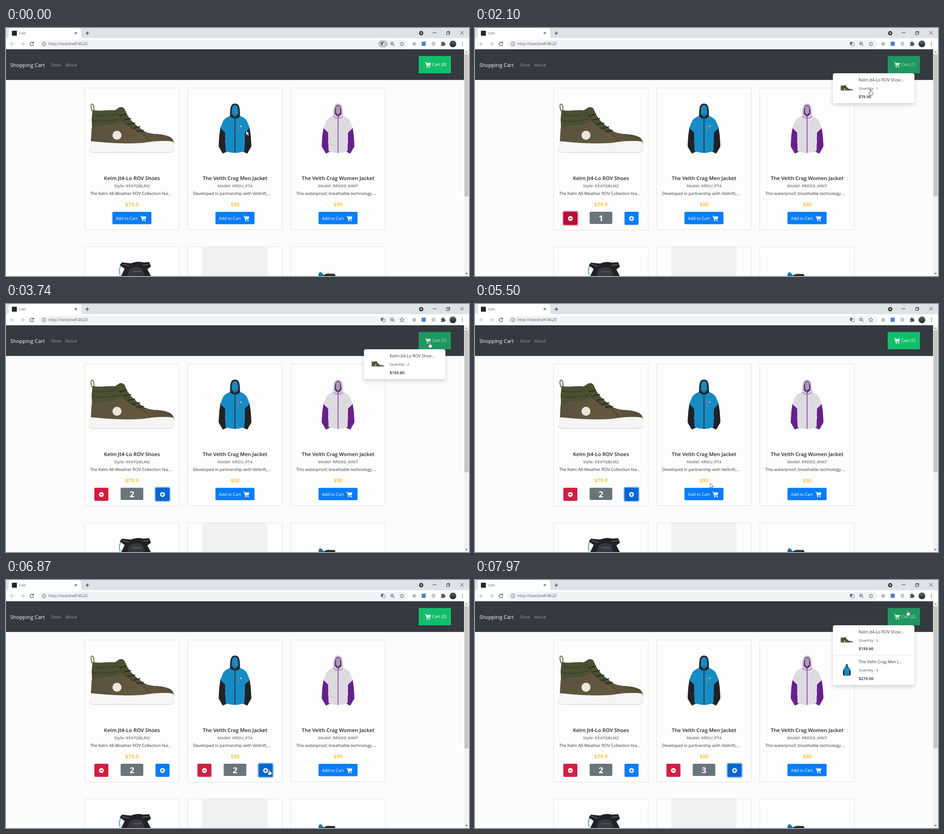
An HTML page for the animation above (8000 ms loop, 1022x548 px).

```html
<!DOCTYPE html>
<html lang="en">
<head>
<meta charset="utf-8">
<title>Cart</title>
<style>
  html, body { margin: 0; width: 100%; height: 100%; overflow: hidden; background: #fcfcfb; }
  svg { display: block; width: 100vw; height: 100vh; }
  text { font-family: "Open Sans", "Noto Sans", sans-serif; font-size: 9.15px; white-space: pre; }
  .mid { text-anchor: middle; }
  .semi { font-weight: 600; }
</style>
</head>
<body>
<svg id="stage" viewBox="0 0 1022 548">
  <defs>
    <g id="cart">
      <path d="M0 0H2.7L3.1 1.5H13L11.5 7.2H4.3L4.6 8.4H11.2V9.5H3.6L1.9 1.2H0Z"/>
      <circle cx="4.9" cy="10.9" r="1.2"/><circle cx="10.4" cy="10.9" r="1.2"/>
    </g>
    <linearGradient id="suede" x2="1" y2="0">
      <stop stop-color="#5a5240"/><stop offset=".6" stop-color="#64583f"/><stop offset="1" stop-color="#574b39"/>
    </linearGradient>
    <g id="shoe">
      <path d="M190 184Q185 170 190 168Q195 168 194 184" fill="none" stroke="#74745f" stroke-width="2.2"/>
      <path d="M191 181C204 185 224 180 240 182L250 175.5Q257 173 262 179L267 191L276 204L290 217L306 229Q316 233 326 234Q352 235 364 242Q371 248 371 257L187 256Q191 226 189 202Z" fill="#4a5034"/>
      <path d="M189 222Q210 213 236 214L258 205Q280 227 308 231Q316 233 326 234Q352 235 364 242Q371 248 371 257L187 256Z" fill="url(#suede)"/>
      <path d="M191 192Q216 197 243 190M190 204Q220 209 250 201" fill="none" stroke="#363b25" stroke-width="1.5"/>
      <path d="M244 183L258 205Q278 227 308 231M292 231Q314 238 318 253" fill="none" stroke="#3c3b29" stroke-width="1.3"/>
      <path d="M255 193L267 190M260 203L276 200M268 213L285 210M278 222L296 218M288 229L304 226" stroke="#2b2f1f" stroke-width="2.6"/>
      <circle cx="253" cy="194" r="1.8" fill="#25271b"/>
      <circle cx="245" cy="237" r="10" fill="#eae6da"/>
      <path d="M186 250Q250 257 300 254Q345 247 369 251Q374 261 371 271Q369 275 358 275H194Q184 275 183 269Z" fill="#f5f5f4"/>
      <path d="M183 270Q185 275 194 275H358Q369 275 371 270" fill="none" stroke="#c9c8c6" stroke-width="1"/>
    </g>
    <linearGradient id="face" x2="0" y2="1">
      <stop stop-color="#5e6a5c"/><stop offset="1" stop-color="#20241f"/>
    </linearGradient>
    <filter id="soft" x="-20%" y="-30%" width="140%" height="170%">
      <feDropShadow dx="0" dy="4" stdDeviation="5" flood-opacity=".17"/>
    </filter>
  </defs>
</svg>
<script>
const LOOP = 8000, STEP = 227.5;
const svg = document.getElementById('stage');

function el(tag, attrs, parent = svg, text) {
  const node = document.createElementNS('http://www.w3.org/2000/svg', tag);
  for (const key in attrs) node.setAttribute(key, attrs[key]);
  if (text !== undefined) node.textContent = text;
  return parent.appendChild(node);
}
const group = (parent, attrs = {}) => el('g', attrs, parent);
const box = (parent, x, y, width, height, fill, rx = 0, more = {}) =>
  el('rect', { x, y, width, height, fill, rx, ...more }, parent);
const dot = (parent, cx, cy, r, fill) => el('circle', { cx, cy, r, fill }, parent);
const shape = (parent, d, fill, more = {}) => el('path', { d, fill, ...more }, parent);
const line = (parent, d, stroke, width = 1) =>
  shape(parent, d, 'none', { stroke, 'stroke-width': width });
const label = (parent, x, y, text, fill, size = 9.15, cls = '') =>
  el('text', { x, y, fill, class: cls, style: `font-size:${size}px` }, parent, text);
const icon = (parent, x, y, fill = '#fff') =>
  el('use', { href: '#cart', x, y, fill }, parent);
const show = (node, on) => node.setAttribute('visibility', on ? 'inherit' : 'hidden');
const write = (node, text) => { if (node.textContent !== text) node.textContent = text; };

// Jacket around x = 0; each half is drawn once and mirrored.
function jacket(parent, c) {
  const g = group(parent);
  for (const side of [1, -1]) {
    const h = group(g, { transform: `scale(${side} 1)` });
    shape(h, 'M-32 219Q-36 240 -36 262L-27 277.5L-17 273L-22 252L-19 228Z', c.sleeve);
    shape(h, 'M.3 191L-10 194Q-23 198 -27 207L-32.5 221L-22 231L-21 272Q-10 276 .3 276Z', c.body);
    shape(h, 'M.3 167C-9 167 -11 174 -11 195L-5 199L.3 199Z', c.hood);
    shape(h, 'M.3 170C-6 170 -7.5 176 -7.5 190L.3 197Z', c.lining);
    line(h, 'M-11 195Q-7 199 -1 200', c.trim);
  }
  shape(g, 'M-4.5 174Q0 170 4.5 174L4.5 187Q0 194 -4.5 187Z', c.inside);
  line(g, 'M0 196V276', c.trim, 1.6);
  if (c.pocket) line(g, 'M7 211V228', c.pocket, 2);
  dot(g, 13, 217, 1.4, c.mark);
  return g;
}
const BLUE = { body: '#178bc4', sleeve: '#202226', hood: '#23262b', lining: '#147fb5',
  inside: '#1a8ac0', trim: '#1d2c3a', pocket: '#77858c', mark: '#e4edf1' };
const GREY = { body: '#dcdbdf', sleeve: '#67208c', hood: '#cfccd2', lining: '#6f2a92',
  inside: '#a5a0a8', trim: '#7d3b9c', mark: '#c6c4c9' };

// Browser frame
box(svg, 0, 0, 1022, 548, '#fcfcfb');
box(svg, 0, 0, 1022, 24, '#dee1e6');
shape(svg, 'M0 23Q6 23 6 17V6Q6 0 12 0H160Q166 0 166 6V17Q166 23 172 23Z', '#fff');
box(svg, 0, 22.5, 1022, 24.5, '#fff');
box(svg, 13, 6, 11, 11, '#20272d', 1);
label(svg, 29, 14, 'Cart', '#45494d', 7.6);
line(svg, 'M151.7 9L156.3 13.6M156.3 9L151.7 13.6', '#4a4d51', 1.1);
line(svg, 'M175.5 11.5H183.5M179.5 7.5V15.5', '#3c4043', 1.3);
dot(svg, 916.5, 11.5, 4.8, '#34373b');
shape(svg, 'M914 10.3H919L916.5 13.5Z', '#fff');
line(svg, 'M942 10.5H950M972.5 9H978V14.5H972.5ZM974 9V7.5H979.5V13H978M1003 7L1010 14M1010 7L1003 14', '#33363a');
line(svg, 'M18.5 35H10.5M14 31L10.2 35L14 39M32 35H40M36.5 31L40.3 35L36.5 39', '#b4b7ba', 1.2);
line(svg, 'M60.3 32.5A4 4 0 1 0 61 36M61 30.5V33.4H58', '#4d5155', 1.3);
box(svg, 72, 26, 817, 18, '#f1f3f4', 9);
el('circle', { cx: 84, cy: 35, r: 4.1, fill: 'none', stroke: '#5f6368' });
line(svg, 'M84 34.3V37.4M84 32.3V33.4', '#5f6368', 1.1);
label(svg, 94, 38, 'http://testshelf:4620', '#5b5f64', 9.1);
const glow = box(svg, 821, 27, 22, 16, '#c6c9cd', 8);
box(svg, 827.5, 30.5, 6, 7, '#6a6e73', 1);
box(svg, 831.5, 33, 5.5, 6.5, '#f1f3f4', 1, { stroke: '#6a6e73', 'stroke-width': .9 });
el('circle', { cx: 852, cy: 34, r: 3, fill: 'none', stroke: '#55595d', 'stroke-width': 1.1 });
line(svg, 'M854.3 36.3L857.3 39.3M850.5 34H853.5', '#55595d', 1.1);
line(svg, 'M874 30.2L875.4 33.4L878.7 33.7L876.2 36L877 39.4L874 37.5L871 39.4L871.8 36L869.3 33.7L872.6 33.4Z', '#55595d', .9);
dot(svg, 901, 35, 4, '#b5b8bb');
box(svg, 917.5, 30, 9, 9.5, '#4c80d8', 1);
box(svg, 939.5, 30.5, 8, 8.5, '#c5c9cc', 1);
shape(svg, 'M960 32H963Q962.5 29.5 964.5 29.5T966 32H968.5V34.5Q970.5 34 970.5 35.8T968.5 37V39.5H960V37Q962 37 962 35.7T960 34.5Z', '#515559');
dot(svg, 986.5, 35, 7.5, 'url(#face)');
for (const y of [31.5, 35, 38.5]) dot(svg, 1007.5, y, 1, '#515559');

// Second row
const lower = group(svg);
for (let i = 0; i < 3; i++)
  box(lower, 173.5 + i * STEP, 483, 209, 90, '#fdfdfd', 2.4, { stroke: '#e0e0df' });
line(lower, 'M252 546Q246 526 262 520', '#3c9cc4', 1.8);
shape(lower, 'M254 548L262 532L251 524L256 518L276 520Q290 514 303 518L316 517L320 527L312 533L320 548Z', '#1f2125');
shape(lower, 'M272 533Q286 524 301 531L306 548H268Z', '#35383d');
line(lower, 'M257 522L272 526M302 524L315 522M279 538H298', '#62666b', 1.6);
box(lower, 433, 483.5, 144, 70, '#f1f1f0');
shape(lower, 'M690 543Q695 537 699 543L703 548H690Z', '#1c6f88');
line(lower, 'M691 541Q695 537 698 543', '#35b5d3', 1.6);
shape(lower, 'M700 548Q706 541 716 543L725 543L728 548Z', '#2a2d31');

// First row
const ITEMS = [
  ['Kelm Jt4-Lo ROV Shoes', 'Style: KE47QBLM2', 'The Kelm All-Weather ROV Collection fea...', '$79.9'],
  ['The Velth Crag Men Jacket', 'Model: KRDU_PT4', 'Developed in partnership with Velitrift,...', '$90'],
  ['The Velth Crag Women Jacket', 'Model: RRDEG_MM7', 'This waterproof, breathable technology ...', '$90']
];
const RED = ['#cf2044', '#b90e35'], PLUS = ['#097df5', '#0866cf'];

function knob(parent, x, colors, ring, sign) {
  const halo = box(parent, x - 1, 405, 33, 31, 'none', 3, { stroke: ring, 'stroke-width': 2.4 });
  const face = box(parent, x, 406, 31, 29, colors[0], 2.4);
  dot(parent, x + 15.5, 421, 5.4, '#fff');
  const mark = line(parent, sign, colors[0], 1.8);
  return on => {
    show(halo, on);
    face.setAttribute('fill', colors[+on]);
    mark.setAttribute('stroke', colors[+on]);
  };
}

const cards = ITEMS.map(([name, code, about, price], i) => {
  const g = group(svg, { transform: `translate(${i * STEP} 0)` });
  const frame = box(g, 173.5, 132.5, 209, 313, '#fdfdfd', 2.4, { stroke: '#dededd' });
  if (i) jacket(g, i === 1 ? BLUE : GREY).setAttribute('transform', 'translate(278 0)');
  else el('use', { href: '#shoe' }, g);
  label(g, 278, 336, name, '#212529', 11.4, 'mid semi');
  label(g, 278, 351.5, code, '#6f777e', 9.1, 'mid semi');
  label(g, 185.7, 369, about, '#34383c');
  label(g, 278, 394, price, '#f6bb1c', 11.5, 'mid semi');
  const add = group(g);
  const face = box(add, 234.8, 406.2, 86.2, 27.4, PLUS[0], 2.4);
  label(add, 242.5, 423.6, 'Add to Cart', '#fff');
  icon(add, 296.5, 415);
  const count = group(g);
  const minus = knob(count, 195, RED, '#eca0b0', 'M207.5 421H213.5');
  box(count, 253, 406, 50, 27, '#6a747b', 2.4);
  const number = label(count, 278, 427, '', '#fff', 18.5, 'mid');
  number.style.fontWeight = 700;
  const plus = knob(count, 330, PLUS, '#8dc2fa', 'M342.5 421H348.5M345.5 418V424');
  return { frame, add, face, count, minus, number, plus };
});

// Page header and scrollbar
box(svg, 0, 47, 1011, 67.8, '#343a40');
label(svg, 9.5, 85.5, 'Shopping Cart', '#fff', 11.5);
label(svg, 99.5, 84.5, 'Store', '#999da0');
label(svg, 131, 84.5, 'About', '#999da0');
box(svg, 911, 62, 71, 38, '#13bf6b');
const dark = box(svg, 911, 62, 71, 38, '#1f985f');
const total = group(svg);
icon(total, 925, 75.5);
const totalText = label(total, 941, 84, '', '#fff');
box(svg, 1011, 47, 11, 501, '#f1f1f1');
box(svg, 1012, 58, 9, 314, '#c6c6c7');
shape(svg, 'M1013.8 54.5L1016.5 51.5L1019.2 54.5Z', '#8a8a8a');
shape(svg, 'M1013.8 541.5L1016.5 544.5L1019.2 541.5Z', '#505050');

// Cart panel
const panel = group(svg);
const sheet = box(panel, 790, 100, 180, 66, '#fff', 4.5, { filter: 'url(#soft)' });
function entry(y, name) {
  const g = group(panel);
  label(g, 847, y + 18, name, '#34383c');
  const amount = label(g, 847, y + 36.2, '', '#4a4e52', 8);
  const sum = label(g, 847, y + 55, '', '#212529', 8.8, 'semi');
  return { g, amount, sum };
}
const rows = [entry(100, 'Kelm Jt4-Lo ROV Shoe...'), entry(166, 'The Velth Crag Men J...')];
el('use', { href: '#shoe', transform: 'translate(779 100) scale(.15)' }, rows[0].g);
jacket(rows[1].g, BLUE).setAttribute('transform', 'translate(820.7 145.4) scale(.24)');
line(rows[1].g, 'M790 166H970', '#e2e4e6');

// Pointer
const pointer = group(svg);
const ink = { stroke: '#33363a', 'stroke-width': .8, 'stroke-linejoin': 'round' };
const arrow = shape(pointer, 'M0 0V10.2L2.4 8L4 11.6L5.7 10.8L4.1 7.4H7.3Z', '#fff', ink);
const hand = shape(pointer, 'M-1 1Q0 -.6 1 1V5L4.8 6Q5.7 6.4 5.5 8L4.7 13H-1.4L-4.2 8.6Q-4 7 -2.4 8L-1 9.2Z', '#fff', ink);

const CLICKS = [[0, 680], [0, 2640], [1, 5750], [1, 6420], [1, 6960]];
const OPEN = [[1390, 2210], [3550, 5110], [7480, 9000]];
// time, x, y, easing into the point
const PATH = [
  [40, 530, 227], [600, 279, 417], [840, 274, 414], [870, 274, 414], [1460, 954, 86],
  [1899, 954, 86], [1900, 957, 87], [2040, 957, 87], [2100, 877, 133, 'in'],
  [2500, 348, 417, 'out'], [2840, 346, 418], [2890, 346, 418], [3660, 939, 86],
  [3739, 939, 86], [3740, 935, 84], [4970, 935, 84], [5500, 519, 396],
  [5690, 508, 416], [5860, 508, 416], [6300, 575, 419], [6600, 581, 418],
  [7030, 581, 418], [7440, 957, 68], [7870, 957, 68], [7970, 955, 66]
];
const EASE = { in: k => k * k, out: k => 1 - (1 - k) ** 3, both: k => k * k * (3 - 2 * k) };
const clamp = v => Math.max(0, Math.min(1, v));

function place(t) {
  const i = PATH.findIndex(p => p[0] >= t);
  if (i < 1) return PATH[i ? PATH.length - 1 : 0].slice(1, 3);
  const a = PATH[i - 1], b = PATH[i];
  const k = EASE[b[3] || 'both']((t - a[0]) / (b[0] - a[0]));
  return [a[1] + (b[1] - a[1]) * k, a[2] + (b[2] - a[2]) * k];
}

function draw(t) {
  const done = CLICKS.filter(c => c[1] <= t);
  const qty = [0, 1, 2].map(i => done.filter(c => c[0] === i).length);
  const last = done.length ? done[done.length - 1][0] : -1;
  const kinds = qty.filter(Boolean).length;
  const [x, y] = place(t);
  const inside = (l, top, w, h) => x >= l && x <= l + w && y >= top && y <= top + h;
  const fade = Math.max(...OPEN.map(([a, b]) => clamp(Math.min((t - a) / 150, (b + 150 - t) / 150))));
  let grab = inside(911, 62, 71, 38) || (fade > .3 && inside(790, 100, 180, 66 * kinds));

  cards.forEach((c, i) => {
    const n = qty[i], dx = i * STEP;
    const spots = n ? [[195, 31], [253, 50], [330, 31]] : [[235, 86]];
    const over = spots.some(([l, w]) => inside(l + dx, 406, w, 29));
    grab = grab || over;
    show(c.add, !n);
    show(c.count, n);
    c.face.setAttribute('fill', over ? '#0869d8' : PLUS[0]);
    c.frame.setAttribute('height', n ? 314 : 313);
    write(c.number, String(n));
    // halos only belong to a visible counter
    c.minus(n === 1 && last === i);
    c.plus(n > 1 && last === i);
  });
  lower.setAttribute('transform', `translate(0 ${kinds ? .6 : 0})`);
  show(glow, t < 40);

  write(totalText, `Cart (${kinds})`);
  dark.setAttribute('opacity', fade);
  total.setAttribute('opacity', 1 - .25 * fade);
  panel.setAttribute('opacity', fade);
  sheet.setAttribute('height', 66 * Math.max(1, kinds));
  rows.forEach((r, i) => {
    show(r.g, qty[i]);
    write(r.amount, `Quantity : ${qty[i]}`);
    write(r.sum, '$' + (qty[i] * [79.9, 90][i]).toFixed(2));
  });

  pointer.setAttribute('transform', `translate(${x.toFixed(1)} ${y.toFixed(1)})`);
  show(arrow, !grab);
  show(hand, grab);
}

const start = performance.now();
function tick() {
  draw((performance.now() - start) % LOOP);
  requestAnimationFrame(tick);
}
draw(0);
requestAnimationFrame(tick);
</script>
</body>
</html>
```
